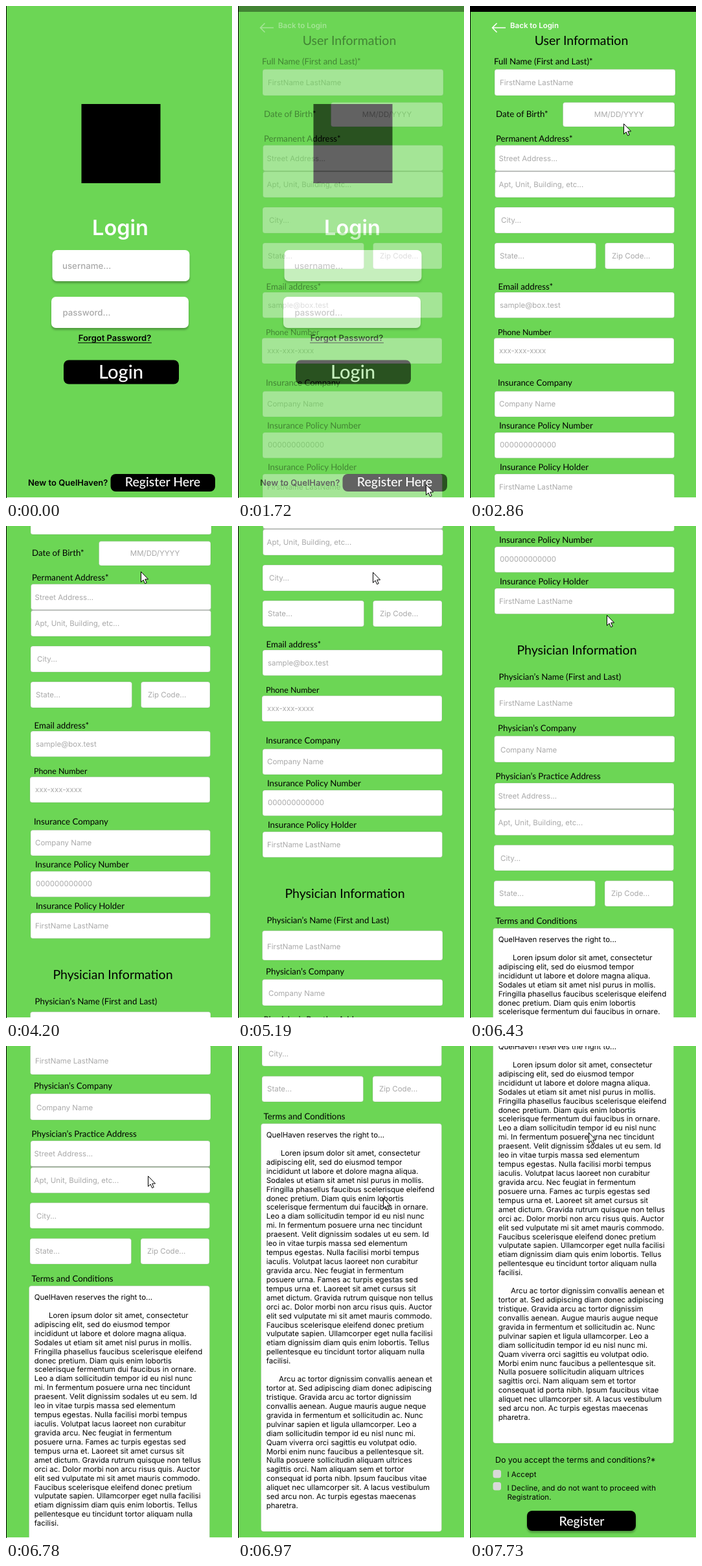
An HTML page that plays this animation: 349 by 758 pixels, repeating every 8 s.

```html
<!DOCTYPE html>
<html lang="en">
<head>
<meta charset="utf-8">
<title>Sign-up form</title>
<style>
  html, body { margin: 0; width: 100%; height: 100%; overflow: hidden; background: #6cd655; }
  svg { display: block; width: 349px; height: 758px; }
  text { white-space: pre; text-rendering: geometricPrecision; }
  .inter { font-family: Inter, sans-serif; }
  .lato { font-family: Lato, sans-serif; }
  .field { fill: #fff; stroke: #6f8f68; stroke-opacity: .45; stroke-width: .6; }
  .raised { filter: drop-shadow(0 3px 1.8px rgba(0, 0, 0, .27)); }
</style>
</head>
<body>
<svg id="stage" viewBox="0 0 349 758">
  <g id="login"></g>
  <g id="form">
    <rect width="349" height="758" fill="#6cd655"/>
    <g id="page"></g>
  </g>
  <rect y="757" width="349" height="1" fill="#fff"/>
  <rect width="1" height="758"/>
  <path id="cursor" d="M.5 .5V16.4L4.1 13L6.6 18.7L9.2 17.6L6.7 12H11.6Z"
        fill="#fff" stroke="#000" stroke-width="1" stroke-linejoin="round"/>
</svg>
<script>
const LOOP = 8000;
const GREY = '#a9a9a9';
const el = id => document.getElementById(id);
const login = el('login'), form = el('form'), page = el('page'), cursor = el('cursor');

function add(parent, tag, attrs, content) {
  const node = document.createElementNS('http://www.w3.org/2000/svg', tag);
  for (const key in attrs) node.setAttribute(key, attrs[key]);
  if (content) node.textContent = content;
  parent.append(node);
}

function box(parent, x, y, right, bottom, rx, attrs) {
  add(parent, 'rect', { x, y, width: right - x, height: bottom - y, rx, ...attrs });
}

function write(parent, font, size, x, y, content, attrs) {
  add(parent, 'text', { class: font, 'font-size': size, x, y, ...attrs }, content);
}

const middle = { 'text-anchor': 'middle' };
const bold = { 'font-weight': 600 };
const buttonText = { ...middle, fill: '#fff', 'font-weight': 500 };

function drawLogin() {
  box(login, 0, 0, 349, 758, 0, { fill: '#6cd655' });
  box(login, 116.5, 151, 238.5, 273, 0);
  write(login, 'inter', 32.5, 176.5, 353, 'Login', { ...middle, ...bold, fill: '#fff' });
  const hint = { fill: GREY, 'font-weight': 500 };
  box(login, 71.5, 376, 283.5, 424, 7, { fill: '#fff', class: 'raised' });
  write(login, 'inter', 13.28, 87, 405, 'username...', hint);
  box(login, 70, 448, 282, 496, 7, { fill: '#fff', class: 'raised' });
  write(login, 'inter', 13.28, 87.5, 477, 'password...', hint);
  write(login, 'inter', 13, 168, 516, 'Forgot Password?', { ...middle, ...bold });
  box(login, 111, 518.4, 225, 519.4, 0);
  box(login, 89, 545.5, 267, 582.5, 8);
  write(login, 'lato', 29.2, 177.5, 574, 'Login', buttonText);
  write(login, 'inter', 13, 34, 739, 'New to QuelHaven?', bold);
  box(login, 161.5, 721, 323, 748, 8);
  write(login, 'lato', 19.5, 242, 740, 'Register Here', buttonText);
}

function field(x, y, right, bottom, hint, hintX, hintY, anchor) {
  box(page, x, y, right, bottom, 3.5, { class: 'field' });
  write(page, 'inter', 11.51, hintX, hintY, hint, { fill: GREY, ...anchor });
}

const label = (x, y, content, size = 13.28) => write(page, 'lato', size, x, y, content);
const heading = (x, y, content) => write(page, 'lato', 19.5, x, y, content, middle);

const terms = `QuelHaven reserves the right to...

Loren ipsum dolor sit amet, consectetur
adipiscing elit, sed do eiusmod tempor
incididunt ut labore et dolore magna aliqua.
Sodales ut etiam sit amet nisl purus in mollis.
Fringilla phasellus faucibus scelerisque eleifend
donec pretium. Diam quis enim lobortis
scelerisque fermentum dui faucibus in ornare.
Leo a diam sollicitudin tempor id eu nisl nunc
mi. In fermentum posuere urna nec tincidunt
praesent. Velit dignissim sodales ut eu sem. Id
leo in vitae turpis massa sed elementum
tempus egestas. Nulla facilisi morbi tempus
iaculis. Volutpat lacus laoreet non curabitur
gravida arcu. Nec feugiat in fermentum
posuere urna. Fames ac turpis egestas sed
tempus urna et. Laoreet sit amet cursus sit
amet dictum. Gravida rutrum quisque non tellus
orci ac. Dolor morbi non arcu risus quis. Auctor
elit sed vulputate mi sit amet mauris commodo.
Faucibus scelerisque eleifend donec pretium
vulputate sapien. Ullamcorper eget nulla facilisi
etiam dignissim diam quis enim lobortis. Tellus
pellentesque eu tincidunt tortor aliquam nulla
facilisi.

Arcu ac tortor dignissim convallis aenean et
tortor at. Sed adipiscing diam donec adipiscing
tristique. Gravida arcu ac tortor dignissim
convallis aenean. Augue mauris augue neque
gravida in fermentum et sollicitudin ac. Nunc
pulvinar sapien et ligula ullamcorper. Leo a
diam sollicitudin tempor id eu nisl nunc mi.
Quam viverra orci sagittis eu volutpat odio.
Morbi enim nunc faucibus a pellentesque sit.
Nulla posuere sollicitudin aliquam ultrices
sagittis orci. Nam aliquam sem et tortor
consequat id porta nibh. Ipsum faucibus vitae
aliquet nec ullamcorper sit. A lacus vestibulum
sed arcu non. Ac turpis egestas maecenas
pharetra.`.split('\n');

function drawForm() {
  box(page, 0, 0, 349, 9, 0);
  add(page, 'path', { d: 'M55 33.5H34.5M41.5 26.5L34.5 33.5L41.5 40.5', fill: 'none', stroke: '#fff', 'stroke-width': 1.5 });
  write(page, 'inter', 11.51, 62, 34, 'Back to Login', { fill: '#fff', ...bold });
  heading(172, 60, 'User Information');

  label(37, 90, 'Full Name (First and Last)*');
  field(38, 97.5, 317, 138, 'FirstName LastName', 46, 122);
  label(40, 171, 'Date of Birth*');
  field(143.5, 148.5, 316, 186, 'MM/DD/YYYY', 230, 171, middle);
  label(40, 208.5, 'Permanent Address*');
  field(38.5, 214.5, 316.5, 254, 'Street Address...', 44.5, 238.5);
  field(38.5, 255, 316.5, 295, 'Apt, Unit, Building, etc...', 44.5, 279);
  box(page, 38.5, 254, 316.5, 255.2, 0, { fill: '#aaa' });
  field(38, 310, 315.5, 350, 'City...', 48, 334);
  field(38, 365, 194.5, 405, 'State...', 46, 388.5);
  field(208.5, 365, 315, 405, 'Zip Code...', 219, 388.5);
  label(43.5, 437, 'Email address*');
  field(38, 441, 315.5, 480.5, 'sample@box.test', 46, 465);
  label(43, 507, 'Phone Number', 12.4);
  field(37, 511.5, 315, 551, 'xxx-xxx-xxxx', 45, 535);
  label(43, 585, 'Insurance Company');
  field(38, 593.5, 315.5, 633, 'Company Name', 45, 617);
  label(45, 651, 'Insurance Policy Number');
  field(38, 657, 315.5, 696.5, '000000000000', 46, 680);
  label(46, 715, 'Insurance Policy Holder');
  field(38, 721, 315.5, 760.5, 'FirstName LastName', 45, 745);

  heading(165, 823, 'Physician Information');
  label(44.5, 862, 'Physician’s Name (First and Last)');
  field(37.5, 873.5, 316, 919, 'FirstName LastName', 45, 902);
  label(43, 941, 'Physician’s Company');
  field(37.5, 948.5, 316, 989, 'Company Name', 47, 974);
  label(39.5, 1015, 'Physician’s Practice Address');
  field(38, 1021, 315, 1061, 'Street Address...', 43.5, 1045);
  field(38, 1062, 315, 1101.5, 'Apt, Unit, Building, etc...', 43.5, 1086);
  box(page, 38, 1060.5, 315, 1061.7, 0, { fill: '#999' });
  field(37, 1116.5, 314.5, 1156, 'City...', 47, 1141);
  field(37, 1171.5, 193.5, 1211, 'State...', 45, 1195);
  field(208, 1171.5, 314, 1211, 'Zip Code...', 218, 1195);

  label(39.5, 1238, 'Terms and Conditions');
  box(page, 35.5, 1244.5, 314.5, 1873, 4, { class: 'field' });
  const indents = { 2: 66, 27: 63 };
  terms.forEach((line, i) => line && write(page, 'inter', 11.51, indents[i] || 43.7, 1266 + i * 13.93, line));

  write(page, 'inter', 12.4, 39, 1903, 'Do you accept the terms and conditions?*');
  box(page, 35.5, 1914, 48, 1926.4, 3.5, { fill: '#d9d9d9' });
  write(page, 'inter', 11.51, 57.5, 1925, 'I Accept');
  box(page, 35.5, 1933, 48, 1945.4, 3.5, { fill: '#d9d9d9' });
  write(page, 'inter', 11.51, 57.5, 1946, 'I Decline, and do not want to proceed with');
  write(page, 'inter', 11.51, 57.5, 1959.9, 'Registration.');
  box(page, 88, 1977, 256, 2008, 8, { class: 'raised' });
  write(page, 'lato', 19.5, 172.5, 1999.5, 'Register', buttonText);
}

// Pointer tip: time, x, y
const trail = [
  [780, 311, 749], [900, 303, 745], [1120, 290, 737],
  [2430, 290, 737], [2500, 295, 713], [2640, 283, 545], [2740, 270, 420],
  [2860, 237, 181], [3000, 222, 112], [3200, 209, 73],
  [3269, 209, 73], [3270, 197, 85], [3600, 197, 85], [3870, 208, 70],
  [5120, 208, 70], [5330, 208, 73], [5520, 208, 73], [5660, 209, 74],
  [5790, 209, 74], [6080, 209, 109], [6430, 211, 137], [6970, 224, 234],
  [7200, 222, 242], [7450, 208, 239], [7730, 183, 133]
];

// Wheel ticks
const TICK = 125, MAX_SCROLL = 1261;
const ticks = [4200, 5190, 6150, 6290, 6430, 6570, 6710, 6840, 6970, 7110, 7250];

function pointerAt(t) {
  const next = trail.findIndex(key => key[0] > t);
  if (next < 0) return trail[trail.length - 1].slice(1);
  const [t0, x0, y0] = trail[next - 1], [t1, x1, y1] = trail[next];
  const p = (t - t0) / (t1 - t0);
  return [x0 + (x1 - x0) * p, y0 + (y1 - y0) * p];
}

function fadeAt(t) {
  if (t < 1720) return 0;
  const p = Math.min(1, (t - 1650) / 330);
  return 1 - (1 - p) ** 2;
}

function render(t) {
  const scroll = Math.min(MAX_SCROLL, TICK * ticks.filter(at => at <= t).length);
  page.setAttribute('transform', `translate(0 ${-scroll})`);
  form.setAttribute('opacity', fadeAt(t));
  const visible = t >= trail[0][0];
  cursor.setAttribute('visibility', visible ? 'visible' : 'hidden');
  if (visible) cursor.setAttribute('transform', `translate(${pointerAt(t).map(Math.round)})`);
}

drawLogin();
drawForm();
render(0);
const start = performance.now();
(function frame() {
  render((performance.now() - start) % LOOP);
  requestAnimationFrame(frame);
})();
</script>
</body>
</html>
```
